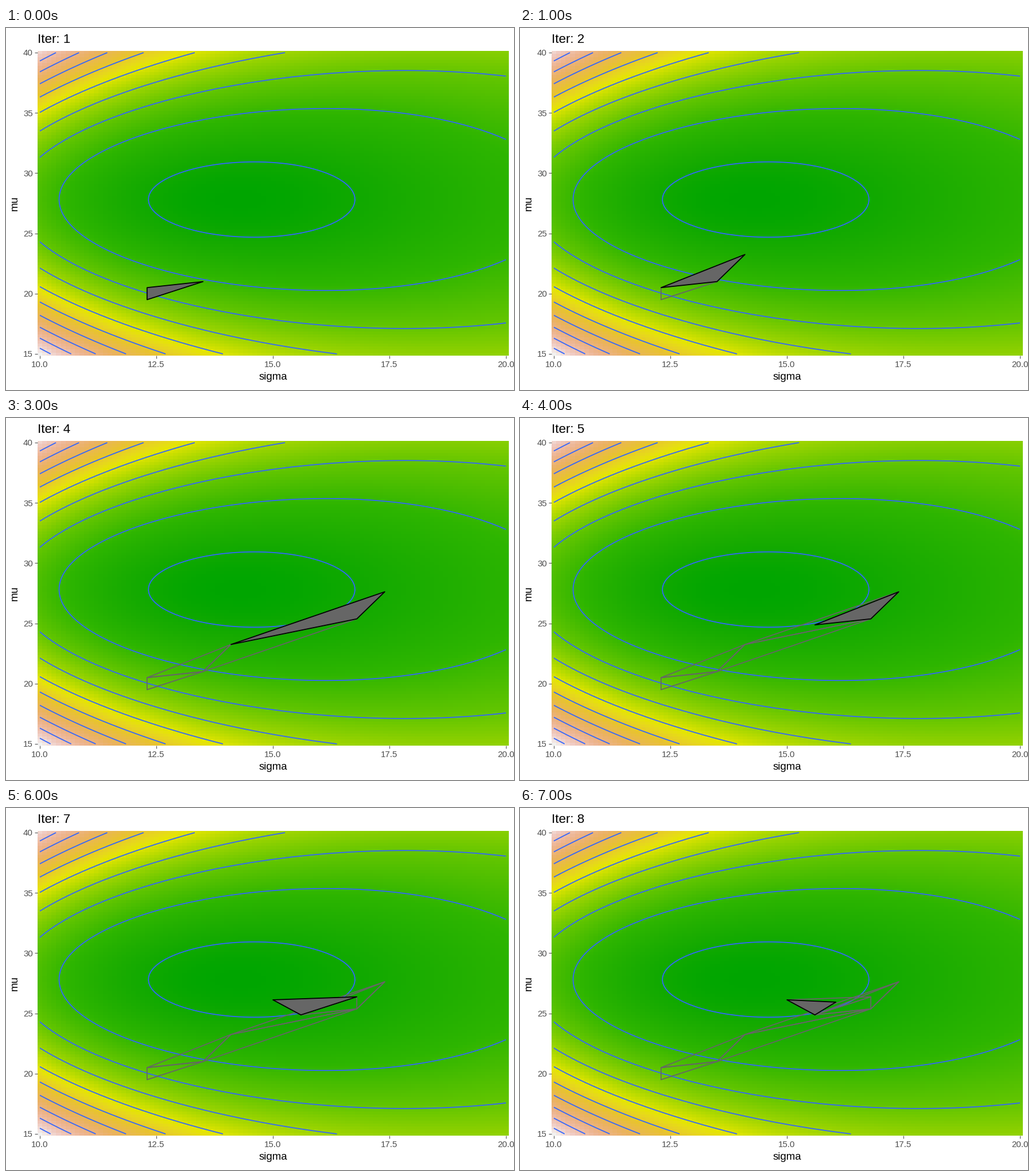
Recreate the animation shown at these times as a matplotlib script. Size 885 by 632 pixels, loop 8000 ms.

```python
import numpy as np
import matplotlib.pyplot as plt
from matplotlib.animation import FuncAnimation
from matplotlib.colors import hsv_to_rgb
from matplotlib.patches import Polygon

W, H, DPI = 885, 632, 100
PX = 72 / DPI                      # points per pixel
LINE = 1.78 * PX
GREY = "#666666"
MEAN, VAR = 27.81, 203.4           # of the fitted normal sample

plt.rcParams["font.family"] = "Liberation Sans"


def neg_log_lik(sigma, mu):
    """Mean negative log-likelihood of a normal distribution."""
    return (np.log(sigma) + 0.5 * np.log(2 * np.pi)
            + (VAR + (mu - MEAN) ** 2) / (2 * sigma ** 2))


# Terrain palette, blended in Lab space
def terrain_stops():
    low = [(h, 1, v) for h, v in zip(np.linspace(1 / 3, 1 / 6, 5),
                                     np.linspace(0.65, 0.9, 5))]
    high = zip(np.linspace(1 / 6, 0, 6), np.linspace(1, 0, 6),
               np.linspace(0.9, 0.95, 6))
    return hsv_to_rgb(np.array(low + list(high)[1:]))


TO_XYZ = np.array([[0.4124, 0.3576, 0.1805],
                   [0.2126, 0.7152, 0.0722],
                   [0.0193, 0.1192, 0.9505]])
WHITE = TO_XYZ.sum(axis=1)
TO_LAB = np.array([[0, 116, 0], [500, -500, 0], [0, 200, -200]])


def rgb_to_lab(rgb):
    lin = np.where(rgb > 0.04045, ((rgb + 0.055) / 1.055) ** 2.4, rgb / 12.92)
    t = lin @ TO_XYZ.T / WHITE
    f = np.where(t > 0.008856, np.cbrt(t), 7.787 * t + 16 / 116)
    return f @ TO_LAB.T


def lab_to_rgb(lab):
    f = lab @ np.linalg.inv(TO_LAB).T
    t = np.where(f > 0.2069, f ** 3, (f - 16 / 116) / 7.787)
    lin = np.clip((t * WHITE) @ np.linalg.inv(TO_XYZ).T, 0, 1)
    return np.where(lin > 0.0031308, 1.055 * lin ** (1 / 2.4) - 0.055,
                    12.92 * lin)


def terrain(values):
    t = (values - values.min()) / np.ptp(values)
    stops = rgb_to_lab(terrain_stops())
    at = np.linspace(0, 1, len(stops))
    lab = np.stack([np.interp(t, at, c) for c in stops.T], axis=-1)
    return lab_to_rgb(lab)


# Nelder-Mead simplexes: each step moves one vertex through the midpoint
# of the other two by a given factor
def simplexes():
    tri = np.array([[12.3, 20.5], [12.3, 19.5], [13.5, 21.0]])
    path = [tri]
    for worst, factor in [(1, 2), (0, 2), (2, 1), (1, -0.5),
                          (2, -0.5), (0, 2), (2, -0.5)]:
        mid = (tri.sum(axis=0) - tri[worst]) / 2
        tri = tri.copy()
        tri[worst] = mid + factor * (mid - tri[worst])
        path.append(tri)
    return path


fig = plt.figure(figsize=(W / DPI, H / DPI), dpi=DPI, facecolor="white")


def label(x, y, text, size, **kw):
    return fig.text(x / W, 1 - y / H, text, fontsize=size * PX,
                    va="baseline", **kw)


# Panel
left, right, top, bottom = 54.94, 875.06, 40.4, 571.6
ax = fig.add_axes([left / W, 1 - bottom / H,
                   (right - left) / W, (bottom - top) / H])
sigma, mu = np.linspace(10, 20, 101), np.linspace(15, 40, 101)
surface = neg_log_lik(*np.meshgrid(sigma, mu))
ax.imshow(terrain(surface), origin="lower", aspect="auto",
          interpolation="nearest", extent=(9.95, 20.05, 14.875, 40.125))
ax.contour(sigma, mu, surface, levels=4.1 + 0.1 * np.arange(10),
           colors="#3366FF", linewidths=LINE)
ax.set(xlim=(9.95, 20.05), ylim=(14.875, 40.125))
for spine in ax.spines.values():
    spine.set_visible(False)

# Axes
xticks, yticks = np.arange(10, 20.1, 2.5), np.arange(15, 41, 5)
ax.set_xticks(xticks)
ax.set_yticks(yticks)
ax.tick_params(length=4.6 * PX, width=0.9 * PX, color="#333333",
               labelbottom=False, labelleft=False)
for v in xticks:
    label(59 + (v - 10) * 81.2, 591.8, f"{v:.1f}", 15,
          ha="center", color="#4D4D4D")
for v in yticks:
    label(46.8, 569 - (v - 15) * 21.04 + 5.3, f"{v}", 15,
          ha="right", color="#4D4D4D")
label(465, 614.3, "sigma", 18.7, ha="center")
fig.text(19.5 / W, 1 - 306 / H, "mu", fontsize=18.7 * PX, rotation=90,
         ha="right", va="center").set_visible(False)
fig.text(19.5 / W, 1 - 306 / H, "mu", fontsize=18.7 * PX, rotation=90,
         rotation_mode="anchor", ha="center", va="baseline")
title = label(55, 26.5, "", 22.4, ha="left")

# Search path
path = simplexes()
style = dict(closed=True, linewidth=LINE, joinstyle="round")
trail = [ax.add_patch(Polygon(t, fill=False, edgecolor=GREY, zorder=4, **style))
         for t in path]
current = ax.add_patch(Polygon(path[0], facecolor=GREY, edgecolor="black",
                               zorder=5, **style))


def draw(i):
    title.set_text(f"Iter: {i + 1}")
    for k, old in enumerate(trail):
        old.set_visible(k < i)
    current.set_xy(path[i])
    return [title, current, *trail]


anim = FuncAnimation(fig, draw, frames=len(path), interval=1000, repeat=True,
                     repeat_delay=0, blit=False)
plt.show()
```
